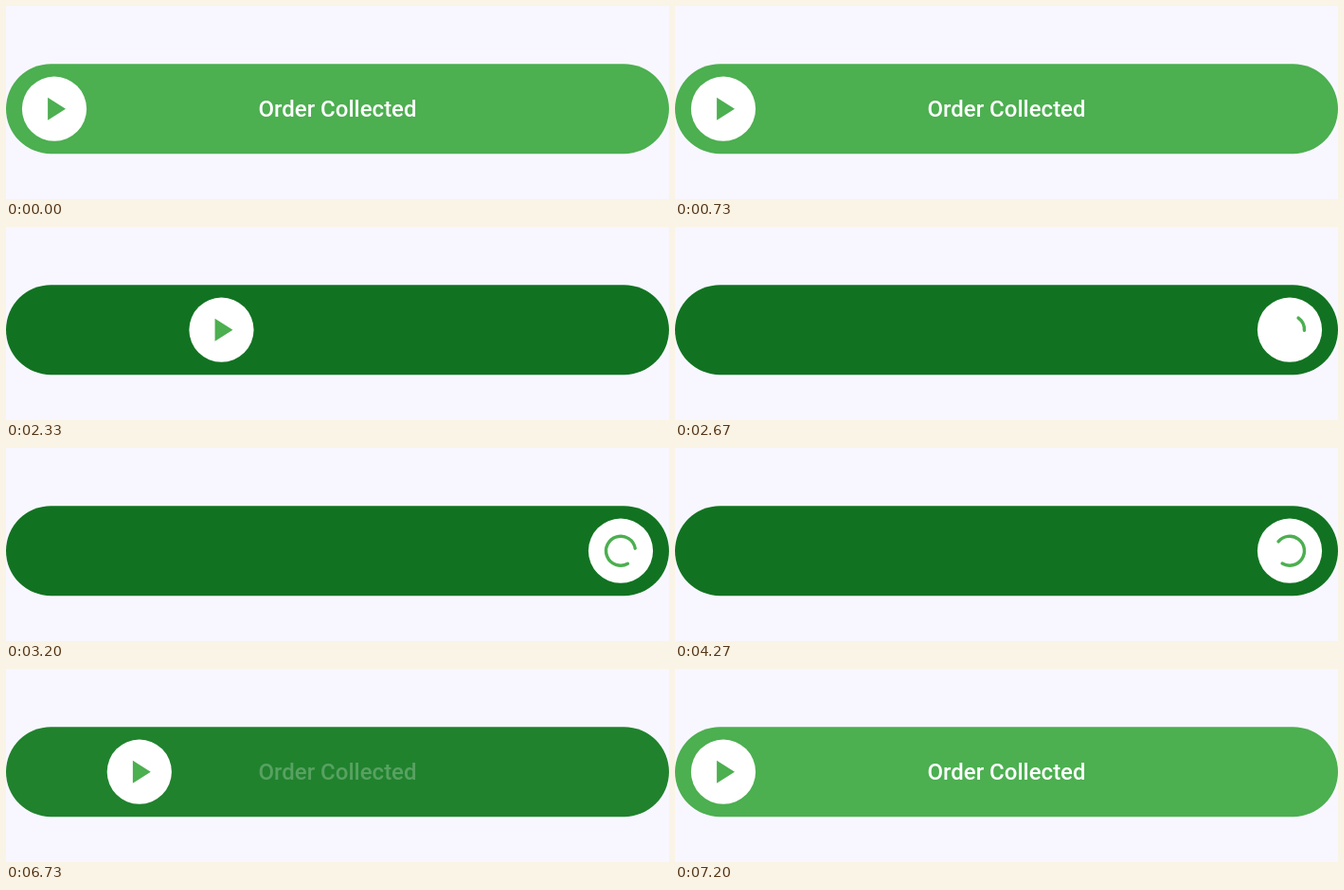
An HTML page for the animation above (7.27 s loop, 700x204 px).

```html
<!DOCTYPE html>
<html lang="en">
<head>
<meta charset="utf-8">
<title>Swipe button</title>
<style>
  html, body { margin: 0; width: 100%; height: 100%; overflow: hidden; background: #f8f7ff; }
  svg { display: block; width: 700px; height: 204px; }
  text { font: 500 24px Roboto, sans-serif; fill: #fff; text-anchor: middle; }
</style>
</head>
<body>
<svg viewBox="0 0 700 204">
  <rect id="track" y="61.2" width="700" height="95" rx="47.5"/>
  <text id="label" x="350" y="117">Order Collected</text>
  <g id="thumb">
    <circle r="34.1" fill="#fff"/>
    <path id="play" d="M-6.9-12V12L12 0Z" fill="#4caf50"/>
    <path id="spinner" fill="none" stroke="#4caf50" stroke-width="3.44" stroke-linecap="round"/>
  </g>
</svg>
<script>
const LOOP = 7270, STEP = 200 / 3;
const HOME = 51, TRAVEL = 598, CENTER_Y = 108.7;
const SPIN_START = 2513, SPIN_END = 6500;
const LIGHT = [76, 175, 80], DARK = [17, 115, 33];

const [track, label, thumb, play, spinner] =
  ['track', 'label', 'thumb', 'play', 'spinner'].map(id => document.getElementById(id));

const clamp = v => Math.min(1, Math.max(0, v));

function bezier(x1, y1, x2, y2) {
  const at = (a, b, u) => 3 * a * u * (1 - u) ** 2 + 3 * b * u * u * (1 - u) + u ** 3;
  return x => {
    let low = 0, high = 1;
    for (let i = 0; i < 24; i++) {
      const mid = (low + high) / 2;
      if (at(x1, x2, mid) < x) low = mid; else high = mid;
    }
    return x <= 0 ? 0 : x >= 1 ? 1 : at(y1, y2, low);
  };
}

const drag = bezier(.6, 0, .8, .9);
const standard = bezier(.4, 0, .2, 1);

const progressAt = t => t < SPIN_END
  ? drag((t - 2108) / 424)
  : 1 - standard((t - SPIN_END) / 410);

// Indeterminate arc: the head runs ahead, then the tail catches up.
function arcAt(t) {
  const turns = t / 1332, cycle = Math.floor(turns), phase = turns - cycle;
  const head = 290 * standard(phase * 2);
  const tail = 290 * standard(phase * 2 - 1);
  const start = -87 + cycle * 216 + phase * 286 + tail;
  const sweep = Math.max(.1, head - tail);
  const point = degrees => {
    const a = degrees * Math.PI / 180;
    return `${(15.48 * Math.cos(a)).toFixed(3)} ${(15.48 * Math.sin(a)).toFixed(3)}`;
  };
  return `M${point(start)}A15.48 15.48 0 ${sweep > 180 ? 1 : 0} 1 ${point(start + sweep)}`;
}

function render(t) {
  const progress = progressAt(t);
  const tint = clamp(progress / .2);
  const spinning = t >= SPIN_START && t < SPIN_END;

  track.setAttribute('fill', `rgb(${LIGHT.map((c, i) => Math.round(c + (DARK[i] - c) * tint))})`);
  label.setAttribute('opacity', 1 - tint);
  thumb.setAttribute('transform', `translate(${HOME + TRAVEL * progress} ${CENTER_Y})`);
  play.style.display = spinning ? 'none' : '';
  spinner.style.display = spinning ? '' : 'none';
  if (spinning) spinner.setAttribute('d', arcAt(t - SPIN_START));
}

const began = performance.now();
function tick() {
  const t = (performance.now() - began) % LOOP;
  render(Math.floor((t + 3.5) / STEP) * STEP);
  requestAnimationFrame(tick);
}
tick();
</script>
</body>
</html>
```
